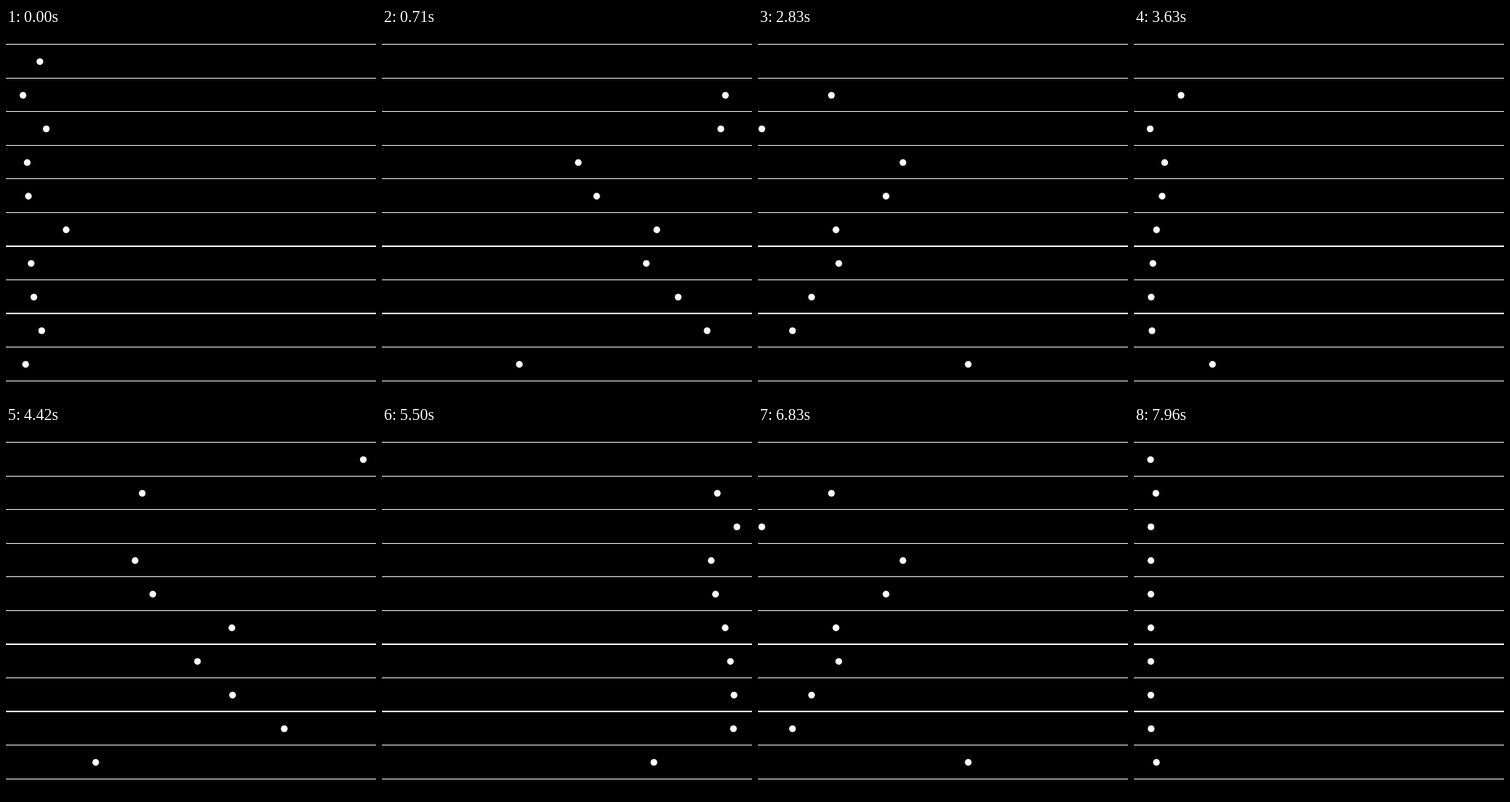
An HTML page with a canvas that plays this animation: 512x512 px, repeating every 8000 ms.

```html
<!DOCTYPE html>
<html>
<head>
<meta charset="utf-8">
<title>Easing lanes</title>
<style>
html, body { margin: 0; height: 100%; overflow: hidden; background: #000; }
canvas { display: block; }
</style>
</head>
<body>
<canvas id="stage" width="512" height="512"></canvas>
<script>
const SIZE = 512;
const GAP = SIZE / 11;
const HALF_CYCLE = 2; // seconds for one crossing
const { sin, cos, sqrt, floor, PI } = Math;
const ctx = document.getElementById('stage').getContext('2d');

const powOut = n => p => 1 - (1 - p) ** n;

function backOut(p) {
  const f = 1 - p;
  return 1 - (f ** 3 - f * sin(f * PI));
}

function bounceOut(p) {
  if (p < 4 / 11) return 121 / 16 * p * p;
  if (p < 8 / 11) return 363 / 40 * p * p - 99 / 10 * p + 17 / 5;
  if (p < 9 / 10) return 4356 / 361 * p * p - 35442 / 1805 * p + 16061 / 1805;
  return 54 / 5 * p * p - 513 / 25 * p + 268 / 25;
}

// One ease-out curve per lane, top to bottom
const lanes = [
  backOut,
  bounceOut,
  p => 1 - cos(6.5 * PI * p) * 2 ** (-10 * p), // elastic
  p => sin(p * PI / 2),
  powOut(2),
  p => sqrt(1 - (1 - p) ** 2), // circular
  powOut(3),
  powOut(4),
  p => 1 - 2 ** (-10 * p), // exponential
  p => p
];

function drawLines() {
  for (let i = 0; i < 11; i++) {
    const y = (i + 0.5) * GAP - 0.5;
    const row = floor(y);
    // Lines close to a pixel boundary cover two rows
    const wide = y - row < 0.2;
    ctx.fillRect(0, wide ? row - 1 : row, SIZE, wide ? 2 : 1);
  }
}

function drawDots(time) {
  const phase = time / HALF_CYCLE % 2;
  lanes.forEach((ease, i) => {
    const travel = phase < 1 ? ease(phase) : 1 - ease(phase - 1);
    ctx.beginPath();
    ctx.arc(GAP / 2 + travel * GAP * 10, (i + 1) * GAP, GAP / 10, 0, 2 * PI);
    ctx.fill();
  });
}

const start = performance.now();

function draw() {
  const ms = (performance.now() - start) % 8000;
  // 24 pictures per second, sampled from a 60 Hz clock
  const frame = floor((ms + 4) * 0.024);
  const time = (floor(frame * 2.5) + 1) / 60;
  ctx.fillStyle = '#000';
  ctx.fillRect(0, 0, SIZE, SIZE);
  ctx.fillStyle = '#fff';
  drawLines();
  drawDots(time);
  requestAnimationFrame(draw);
}
draw();
</script>
</body>
</html>
```
